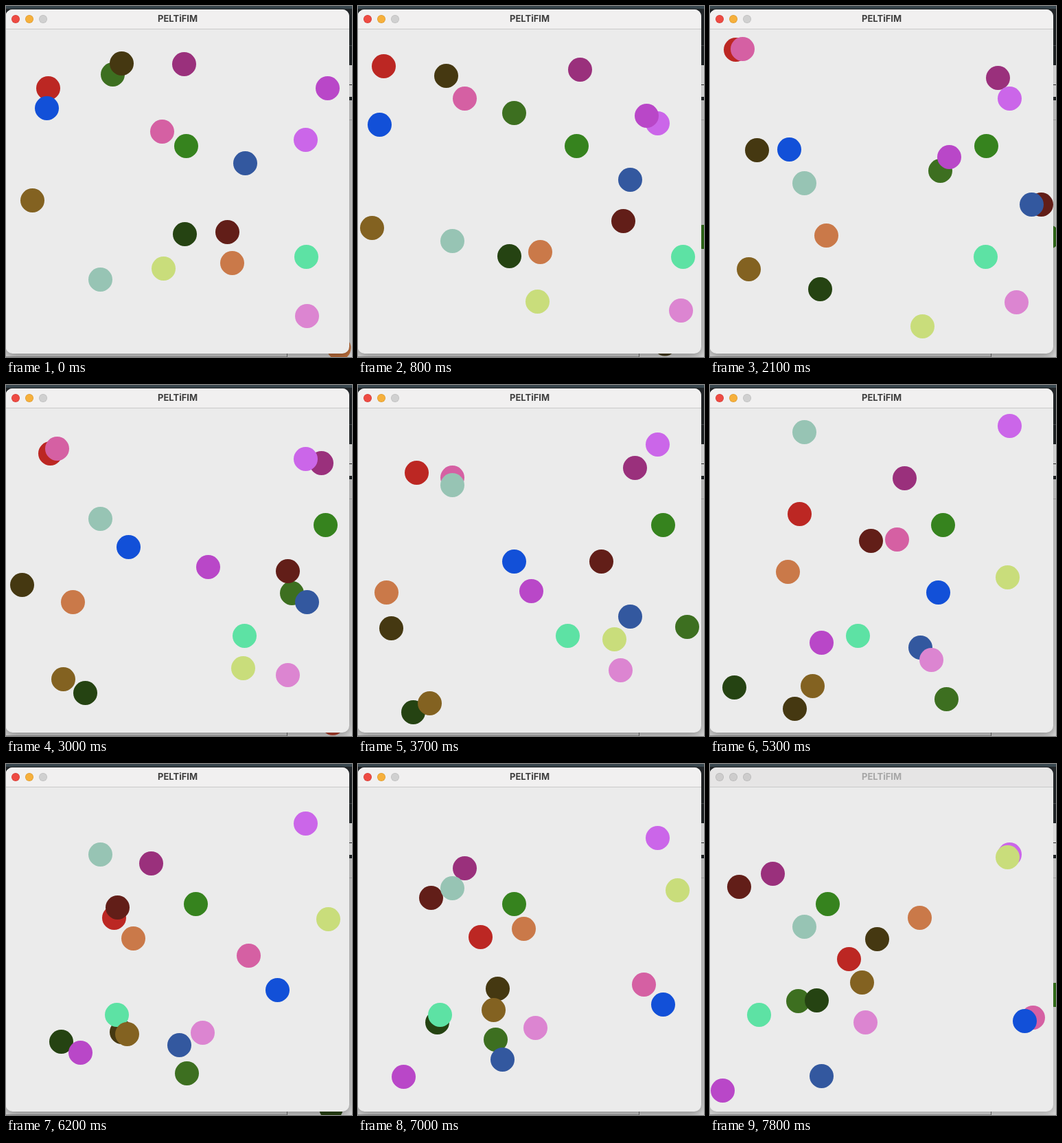
Write an HTML page with a canvas that moves like this. It is 504 by 510 pixels and loops after 7.9 s.

```html
<!DOCTYPE html>
<html lang="en">
<head>
<meta charset="utf-8">
<title>Bouncing balls</title>
<style>
  html, body { margin: 0; width: 504px; height: 510px; overflow: hidden; }
  canvas { display: block; }
</style>
</head>
<body>
<canvas id="stage" width="504" height="510"></canvas>
<script>
const ctx = document.getElementById('stage').getContext('2d');
const LOOP = 7900, STEP = 100, BLUR_AT = 7600, R = 17.5;
const BOX = { left: 17, right: 482, top: 50, bottom: 487 };

// colour, start x, start y, speed x, speed y; listed back to front
const BALLS = [
  ['#3d6f20', 155, 99, 9, 7],
  ['#bc2723', 61, 119, -3, -4],
  ['#254312', 260, 331, -5, 4],
  ['#d560a3', 227, 182, -9, -6],
  ['#9a307c', 259, 84, 8, 1],
  ['#cb66e9', 436, 194, 0, -3],
  ['#621e18', 322, 328, 8, -2],
  ['#33589f', 348, 228, 6, 3],
  ['#453811', 168, 83, -5, -9],
  ['#5de2a4', 437, 364, 6, 0],
  ['#836221', 38, 282, -3, 5],
  ['#b947c8', 468, 119, -6, 5],
  ['#36831e', 262, 203, 7, 0],
  ['#97c4b4', 137, 397, 0, -7],
  ['#ca7949', 329, 373, -8, -2],
  ['#dc85d1', 438, 450, 4, -1],
  ['#c9dd7b', 229, 381, 4, 6],
  ['#1250d8', 59, 148, -7, 3]
];

// balls of the window behind: colour, tick, x and y at that tick, speeds
const BACK_BALLS = [
  ['#36761c', 8, 502, 335.5, 7, 0],
  ['#c4733f', 0, 485, 497, -4, -6],
  ['#463c12', 8, 447, 491, -3, -6],
  ['#b8432f', 29, 476, 491.5, 0, -6],
  ['#2c4714', 60, 473.5, 500, 0, -6]
];

function rect(color, x, y, w, h) {
  ctx.fillStyle = color;
  ctx.fillRect(x, y, w, h);
}

function disc(color, x, y, r) {
  ctx.fillStyle = color;
  ctx.beginPath();
  ctx.arc(x, y, r, 0, Math.PI * 2);
  ctx.fill();
}

// turn around before a step that would leave the range
function bounce(pos, speed, ticks, min, max) {
  for (let i = 0; i < ticks; i++) {
    if (pos + speed < min || pos + speed > max) speed = -speed;
    pos += speed;
  }
  return pos;
}

function fold(v, min, max) {
  const span = max - min;
  const m = (((v - min) % (2 * span)) + 2 * span) % (2 * span);
  return min + (m > span ? 2 * span - m : m);
}

function drawDesktop(tick) {
  rect('#d6d6d6', 0, 0, 504, 510);
  rect('#3b4a52', 0, 0, 504, 5);
  rect('#24282b', 0, 4, 504, 30);
  rect('#24282b', 499, 5, 5, 81);
  rect('#4b4f52', 499, 57, 5, 1);
  rect('#f4f4f4', 499, 86, 5, 46);
  rect('#333333', 499, 114, 5, 1);
  rect('#24282b', 499, 132, 5, 5);
  rect('#b4b4b4', 499, 165, 5, 1);
  for (const [color, at, x, y, vx, vy] of BACK_BALLS) {
    const dt = tick - at;
    disc(color, fold(x + vx * dt, 305, 539.5), fold(y + vy * dt, 50, 502), R);
  }
  rect('#9a9a9a', 0, 509, 410, 1);
  rect('#6e6e6e', 409, 505, 1, 5);
}

function drawWindow(active) {
  ctx.beginPath();
  ctx.roundRect(-0.5, 5, 500.5, 500, 10);
  ctx.save();
  ctx.shadowColor = active ? 'rgba(0,0,0,.4)' : 'rgba(0,0,0,.25)';
  ctx.shadowBlur = 14;
  ctx.shadowOffsetY = 3;
  ctx.fillStyle = '#ebebeb';
  ctx.fill();
  ctx.restore();

  ctx.save();
  ctx.clip();
  rect(active ? '#f1f0f0' : '#e6e5e5', 0, 5, 500, 28);
  rect('#c9c9c9', 0, 33, 500, 1);
  ctx.restore();

  const lights = active
    ? [['#ee4b43', '#d23c35'], ['#f6b03c', '#dc9a2d'], ['#d0d0d0', '#bdbdbd']]
    : Array(3).fill(['#cdcccc', '#b5b5b5']);
  lights.forEach(([fill, edge], i) => {
    disc(edge, 14 + i * 20, 19, 6);
    disc(fill, 14 + i * 20, 19, 5.3);
  });

  ctx.font = 'bold 13px Inter, sans-serif';
  ctx.textAlign = 'center';
  ctx.fillStyle = active ? '#3e3e3e' : '#a6a6a6';
  ctx.fillText('PELTiFIM', 250, 23);
}

function draw(time) {
  const step = Math.floor((time % LOOP) / STEP);
  // the simulation ticks slightly slower than the picture
  const tick = Math.floor(step * 75 / 78 + 0.55);
  drawDesktop(tick);
  drawWindow(step * STEP < BLUR_AT);
  for (const [color, x, y, vx, vy] of BALLS) {
    disc(color,
      bounce(x, vx, tick, BOX.left, BOX.right) + 0.5,
      bounce(y, vy, tick, BOX.top, BOX.bottom) + 0.5, R);
  }
}

const start = performance.now();
function loop() {
  draw(performance.now() - start);
  requestAnimationFrame(loop);
}
loop();
</script>
</body>
</html>
```
